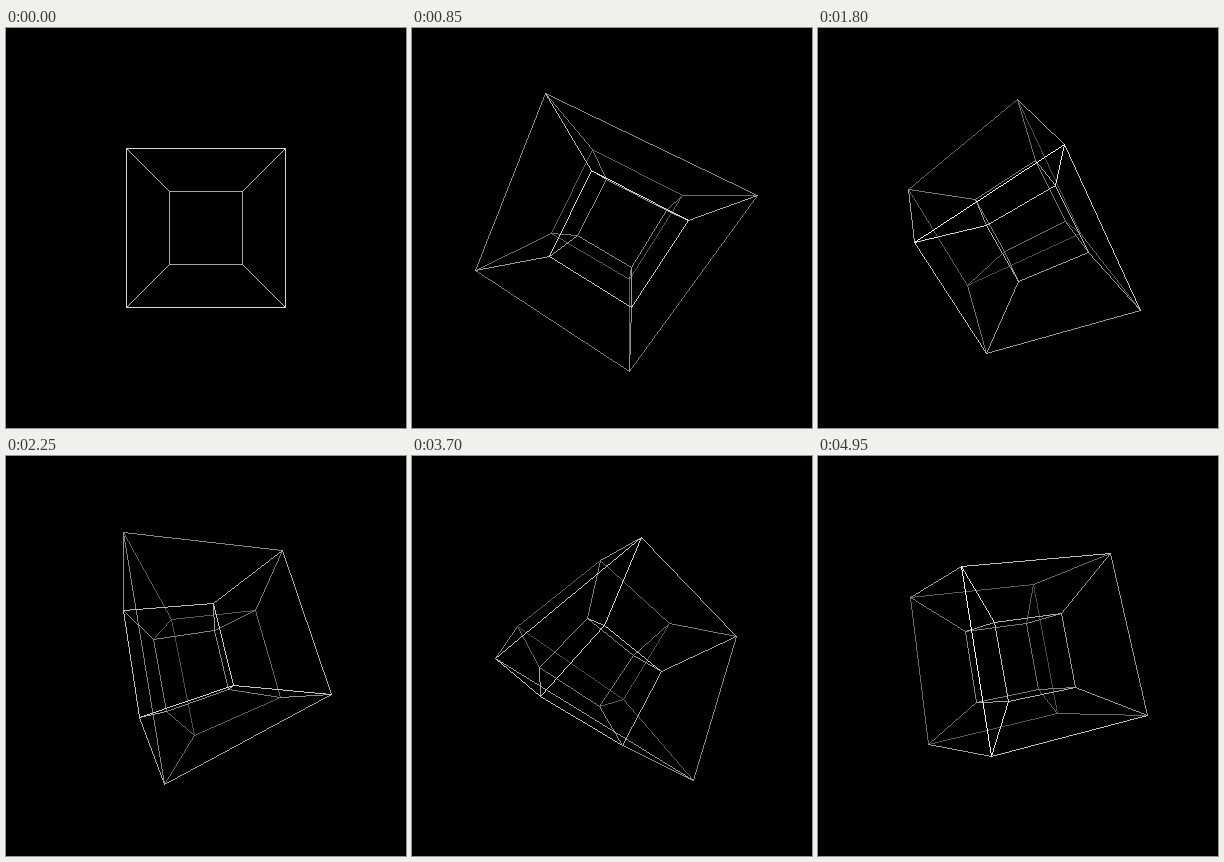
Animation, 400 px wide and 400 px high, one loop 5000 ms. Source, as an HTML page with a canvas:

```html
<!DOCTYPE html>
<html lang="en">
<head>
<meta charset="utf-8">
<title>Rotating tesseract</title>
<style>
  html, body { margin: 0; width: 100%; height: 100%; overflow: hidden; background: #000; }
  canvas { display: block; }
</style>
</head>
<body>
<canvas id="stage" width="400" height="400"></canvas>
<script>
const ctx = document.getElementById('stage').getContext('2d');
const STEP = 50, STEPS = 100;
const SIZE = 49.999, CENTER = 200, PERSPECTIVE = 0.375;
const X = 0, Y = 1, Z = 2, W = 3;

// Planes are turned in this order; the last value is radians per step.
const turns = [[X, W, 0.1], [Y, Z, 0.08], [X, Y, 0.03], [Z, W, 0.05]];

// Returns whole-pixel x and y, and the depth.
function project(index, step) {
  const v = [0, 1, 2, 3].map(axis => (index >> axis & 1) * 2 - 1);
  for (const [a, b, rate] of turns) {
    const c = Math.cos(rate * step), s = Math.sin(rate * step);
    [v[a], v[b]] = [v[a] * c - v[b] * s, v[a] * s + v[b] * c];
  }
  const scale = 1 / (1 - PERSPECTIVE * v[W]);
  const toPixel = value => Math.floor(CENTER + SIZE * value * scale);
  return [toPixel(v[X]), toPixel(v[Y]), v[Z] * scale];
}

// Crisp one-pixel line between whole pixels; nearer edges are brighter.
function drawLine([x0, y0, z0], [x1, y1, z1]) {
  const dx = x1 - x0, dy = y1 - y0;
  const count = Math.max(1, Math.abs(dx), Math.abs(dy));
  const along = (d, i) => Math.sign(d) * Math.floor((2 * Math.abs(d) * i + count) / (2 * count));
  const gray = Math.min(255, Math.round(135 * 1.33 ** ((z0 + z1) / 2)));
  ctx.fillStyle = `rgb(${gray},${gray},${gray})`;
  for (let i = 0; i <= count; i++) {
    ctx.fillRect(x0 + along(dx, i), y0 + along(dy, i), 1, 1);
  }
}

function draw(step) {
  ctx.globalCompositeOperation = 'source-over';
  ctx.fillStyle = '#000';
  ctx.fillRect(0, 0, 400, 400);
  ctx.globalCompositeOperation = 'lighten';
  const points = Array.from({ length: 16 }, (_, i) => project(i, step));
  for (let i = 0; i < 16; i++) {
    for (let bit = 1; bit < 16; bit *= 2) {
      if (!(i & bit)) drawLine(points[i], points[i | bit]);
    }
  }
}

const start = performance.now();
function tick() {
  draw(Math.floor((performance.now() - start) / STEP) % STEPS);
  requestAnimationFrame(tick);
}
tick();
</script>
</body>
</html>
```
